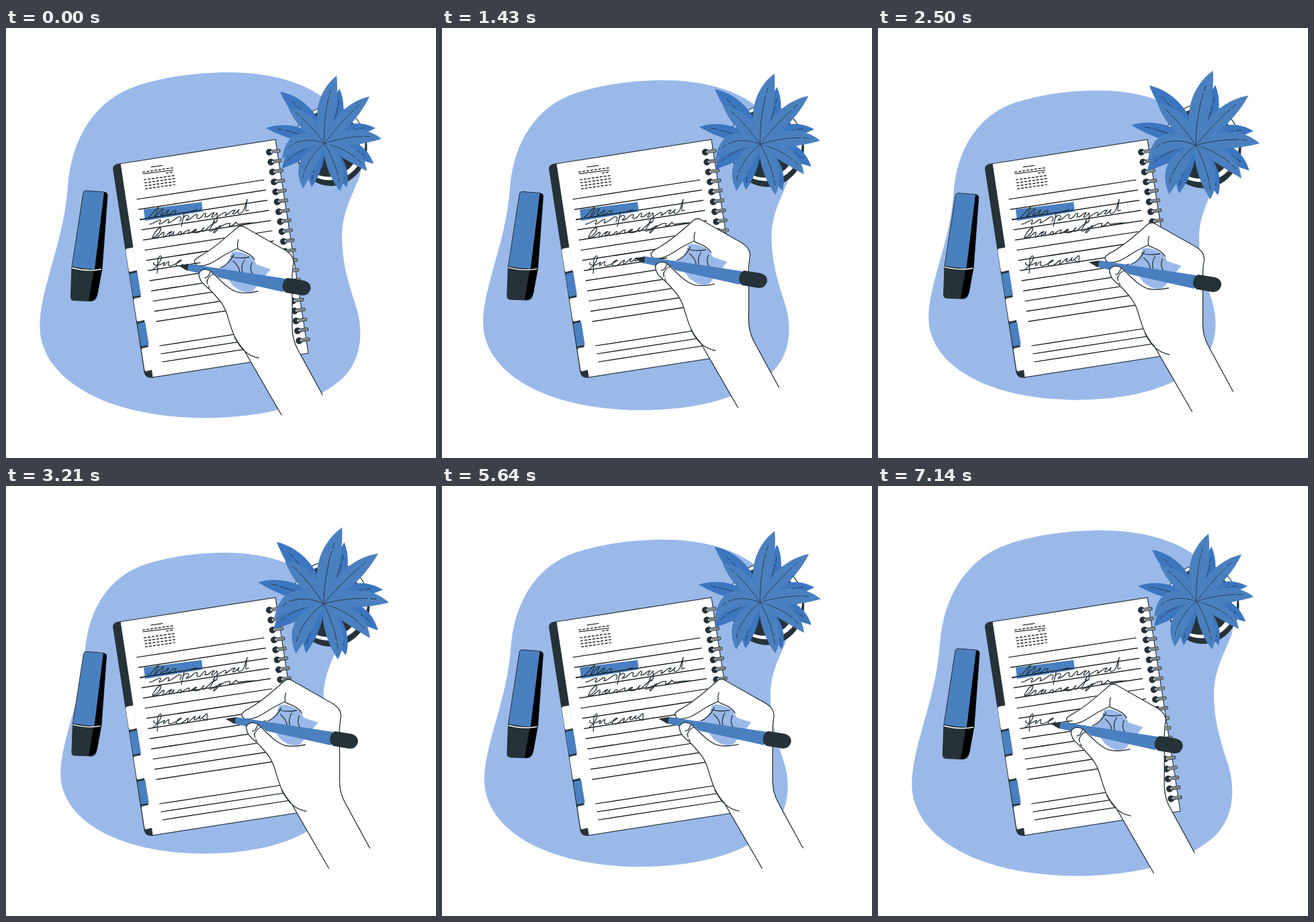
Animation of 640 by 640 pixels, one loop 7210 ms. Source, as an HTML page:

```html
<!DOCTYPE html>
<html lang="en">
<head>
<meta charset="utf-8">
<title>Writing in a notebook</title>
<style>
  html, body { margin: 0; width: 100%; height: 100%; overflow: hidden; background: #fff; }
  svg { display: block; width: 100vw; height: 100vh; }
  .ink { fill: none; stroke: #263238; stroke-width: 1.3; stroke-linecap: round; stroke-linejoin: round; }
  .outline { stroke: #263238; stroke-width: 1.2; }
  .rule { stroke: #000; stroke-width: 1.25; }
  .dark { fill: #263238; }
  .blue { fill: #4a80bf; }
  .deep { fill: #3c76bf; }
  .pale { fill: #9ab9e9; }
  .white { fill: #fff; }
</style>
</head>
<body>
<svg viewBox="0 0 640 640">
  <clipPath id="written"><rect id="reveal" x="200" y="325" width="100" height="50"/></clipPath>

  <path id="blob" class="pale" d="M332 66C280 66 232 74 195 86C135 106 98 160 92 235C88 290 74 330 62 375C50 420 46 450 56 475C75 528 150 578 292 580.5C390 580 455 560 498 524C528 498 533 455 522 418C510 380 500 350 500 310C500 275 515 250 526 222C538 180 520 140 470 102C440 80 390 66 332 66Z"/>

  <g id="marker">
    <path class="dark outline" d="M115 246Q116 242 120 242L145 244Q151 245 151 249L143 358L136 396Q134 406 127 406.500L101 405.500Q96 405 96.500 399L98 356Z"/>
    <path fill="#000" d="M146 244Q151 245 151 249L143 358L136 396Q134 406 123 406.500L131 359Z"/>
    <path class="blue" d="M115.500 246Q116 242.500 120 242.500L146 244.500L132 359Q114 358 98.500 355Z"/>
    <path d="M98 357Q122 363 142 359" fill="none" stroke="#fff" stroke-width="1.4"/>
  </g>

  <g id="notebook">
    <path class="dark outline" d="M170 202Q158 203 160 212L206 512Q208 521 218 520Z"/>
    <path class="white outline" d="M170 202L401 166L450 484L218 520Z"/>
    <g id="tabs"></g>
    <g id="rules"></g>
    <g class="rule" stroke-width="1.5">
      <path d="M215.500 207L233.500 204.500M203.500 217L249 211.500"/>
      <path stroke-dasharray="4 2" d="M203 214.500L249 208M238 216L250 214M205 226L251 219.500M206 230.500L251.500 224M206.500 235L252 228.500M207 239.500L252 233"/>
    </g>
    <path class="blue" d="M205 270L291 259L293 273L207 287Z"/>
    <path class="rule" d="M199 285L291 271"/>
    <g class="ink">
      <path d="M212 281C216 281 223 268 227 267C229 268 221 278 221 281C226 279 231 268 234 269C235 271 229 278 231 279C236 277 240 271 242 271C243 273 237 278 239 279C245 277 250 270 253 272C254 275 248 277 251 277C259 275 270 276 284 270"/>
      <path d="M214 292C220 291 227 285 230 286C231 289 226 292 229 292C235 290 239 284 242 285C244 288 239 291 242 290C249 288 254 282 257 281C261 280 262 283 259 288M265 277L261 295M264 282C270 276 276 280 268 286C276 287 280 275 285 278C282 287 288 284 292 280C296 273 299 275 296 281C302 283 305 274 310 275C302 284 308 284 314 275C315 284 315 291 309 290C307 286 318 278 323 276C327 272 329 276 326 279C332 278 335 270 341 271C333 280 341 278 347 270C342 279 350 277 354 271L359 255L357 269C356 275 359 271 361 271"/>
      <path d="M218 312C225 311 233 299 230 297C225 298 214 314 220 313C228 312 231 304 235 304C237 307 231 310 235 311C240 309 242 303 247 303C239 309 244 312 250 303C247 311 251 309 255 307C261 300 263 303 259 308C266 305 270 299 273 301C270 307 274 306 281 300C286 298 283 302 277 304C287 307 291 302 295 297C287 303 293 305 299 299L311 288C304 298 300 304 306 302C313 298 317 295 320 294L312 303C308 308 307 302 316 298C326 291 331 290 334 291C329 297 337 296 342 289C344 289 343 293 347 292Q358 290 370 290"/>
      <path clip-path="url(#written)" d="M219 359C224 357 235 341 230 339C223 342 227 354 225 365M220 349C218 355 229 354 235 349C239 347 231 355 236 353C241 347 244 346 242 350C239 358 253 352 261 346C260 343 251 351 254 354C260 356 266 350 270 346C274 344 269 350 270 352C276 349 279 343 282 343C277 350 282 350 289 342C285 349 290 348 298 339C302 338 297 345 300 348C298 349 295 348 293 346"/>
    </g>
    <g id="rings"></g>
  </g>

  <g id="pot">
    <ellipse class="dark" cx="484" cy="178" rx="53.500" ry="57"/>
    <ellipse class="white outline" cx="482" cy="172" rx="53" ry="55"/>
    <ellipse class="dark" cx="480" cy="172" rx="46.500" ry="49.500"/>
  </g>
  <g id="leaves"></g>

  <g id="hand">
    <path class="white" d="M280 347C280 343 283 342 287 340C308 329 327 311 343 297Q349 293 356 297L409 327Q428 337 428 348L426 390L426 440Q425 462 434 478L471 546L410 576L354 479C338 461 336 448 331 433C326 414 320 407 305 391Q287 380 287 366Q290 357 302 361L319 357Z"/>
    <path class="pale" d="M319 357Q333 350 336 334Q347 329 367 342L373 352L394 359L368 391Q354 398 337 383Z"/>
    <path class="ink" d="M285 353.500Q280 351 280.500 346C284 341 289 340 293 337C311 327 328 311 343 298Q349 292 356 297L409 327C425 335 428 342 428 350L427 356Q425 372 426 390L426 440Q425 462 434 478L471 546"/>
    <path class="ink" d="M285 353.500C300 356 312 346 325 338Q338 331 345 328M345 328C346 332 362 332 370 345M346 315Q344 320 345 328M319 357Q333 351 339 337M335 340Q346 344 362 341M338 347Q347 354 348 364M355 345Q349 354 352 364M366 349Q360 363 374 373"/>
    <path class="blue" d="M272 351L416 373L413 393L270 361Z"/>
    <path class="dark" d="M256 353.500L272 351L270 361.500ZM419 372L444 376Q454 379 453.500 388Q451 398 441 398L417 394Q411 391 411.500 383Q413 374 419 372Z"/>
    <path class="white" d="M287 366Q290 357 301 360C314 366 329 386 345 392L349 430L331 433C326 414 320 407 305 391Q287 380 287 366Z"/>
    <path class="ink" d="M410 576L354 479C338 461 336 448 331 433C326 414 320 407 305 391C294 381 288 378 287 366C290 357 301 358 307 364C316 372 329 388 344 393Q356 396 375 392M340 460C350 479 360 488 376 491M296 372Q301 372 304 363M299 378Q301 369 309 366M299 376L300 381M301 384L303 387"/>
  </g>
</svg>
<script>
const LOOP = 7210;
const byId = id => document.getElementById(id);
const add = (id, markup) => byId(id).insertAdjacentHTML('beforeend', markup);

// Index tabs run down the left cover, alternating white and blue.
for (let i = 0; i < 5; i++) {
  const x = 178 + i * 5.9, y = 328.5 + i * 37;
  add('tabs', `<path class="${i % 2 ? 'blue' : 'white'}"
    d="M${x + 1.5} ${y}L${x + 11.5} ${y - 2}L${x + 17} ${y + 32}L${x + 6.5} ${y + 34.5}Q${x + 5} ${y + 34} ${x + 4.7} ${y + 32}L${x} ${y + 2}Z"/>`);
}

const rule = (x, y) => add('rules', `<path class="rule" d="M${x} ${y}l190 -29"/>`);
for (let i = 0; i < 13; i++) rule(194.3 + i * 2.42, 255 + i * 15.15);
for (let i = 0; i < 3; i++) rule(228.3 + i * 2.1, 473 + i * 12);

for (let i = 0; i < 20; i++) {
  add('rings', `<g transform="translate(${392 + i * 2.33} ${184.8 + i * 14.77}) rotate(-8)">
    <circle class="dark" r="5"/>
    <rect class="white outline" x="1" y="-2.2" width="15" height="4" rx="1.5"/>
    <path class="outline" d="M3 -.2h12"/></g>`);
}

// A leaf grows from the heart of the plant; bend pushes its belly sideways.
function leaf(tone, tipX, tipY, width, bend = 0) {
  const baseX = 474, baseY = 172, dx = tipX - baseX, dy = tipY - baseY;
  const length = Math.hypot(dx, dy), nx = -dy / length, ny = dx / length;
  const at = (along, side) => `${(baseX + dx * along + nx * side).toFixed(1)} ${(baseY + dy * along + ny * side).toFixed(1)}`;
  const edge = side => `${at(.25, bend * .7 + side)} ${at(.7, bend + side)}`;
  add('leaves', `<path class="${tone}" d="M${at(0, 0)}C${edge(width)} ${at(1, 0)}C${at(.7, bend - width)} ${at(.25, bend * .7 - width)} ${at(0, 0)}Z"/>
    <path class="ink" style="stroke-width:.8" stroke-dasharray="${length * .68} 4 7 200"
      d="M${at(0, 0)}C${edge(0)} ${at(.9, bend * .25)}"/>`);
}
[
  [408, 95, 17, 8], [387, 149, 13, 6], [496, 90, 14, 8], [550, 149, 14, -10],
  [547, 202, 15, -12], [411, 209, 16, 12], [455, 237, 13, 6], [507, 237, 13, -6]
].forEach(shape => leaf('deep', ...shape));
[
  [420, 118, 15, 5], [541, 102, 15, -5], [411, 196, 16, 24], [442, 239, 16, 14],
  [537, 213, 14, -12], [497, 243, 15, -7], [559, 165, 15, -9], [492, 71, 18, -9]
].forEach(shape => leaf('blue', ...shape));

// Pen path: time, x and y offset.
const penPath = [
  [0, 0, 0], [1430, 30.5, -11], [2050, 46, -4], [2500, 57.5, -5],
  [3210, 70.5, -7], [3900, 72.5, -8], [5270, 72.5, -8], [LOOP, 0, 0]
];
function penOffset(time) {
  const i = penPath.findIndex(key => key[0] > time);
  const from = penPath[i - 1], to = penPath[i];
  let p = (time - from[0]) / (to[0] - from[0]);
  if (i === penPath.length - 1) p = (1 - Math.cos(Math.PI * p)) / 2;
  return [1, 2].map(axis => from[axis] + (to[axis] - from[axis]) * p);
}

const scaleAbout = (id, x, y, scale, extra = '') =>
  byId(id).setAttribute('transform', `translate(${x} ${y}) ${extra} scale(${scale}) translate(${-x} ${-y})`);

function draw(now) {
  const time = now % LOOP;
  const swell = (1 - Math.cos(2 * Math.PI * time / LOOP)) / 2;
  scaleAbout('blob', 289, 323.5, 1 - .133 * swell);
  scaleAbout('marker', 123.5, 325, 1 - .057 * swell);
  scaleAbout('pot', 484, 177, 1 + .075 * swell);
  scaleAbout('leaves', 473, 172, 1 + .145 * swell,
    `translate(${-1.5 * swell} ${3.5 * swell}) rotate(${3.6 * swell})`);

  const [x, y] = penOffset(time);
  byId('hand').setAttribute('transform', `translate(${x} ${y})`);
  byId('reveal').setAttribute('width', 64 + x);
  requestAnimationFrame(() => draw(performance.now()));
}
draw(performance.now());
</script>
</body>
</html>
```
